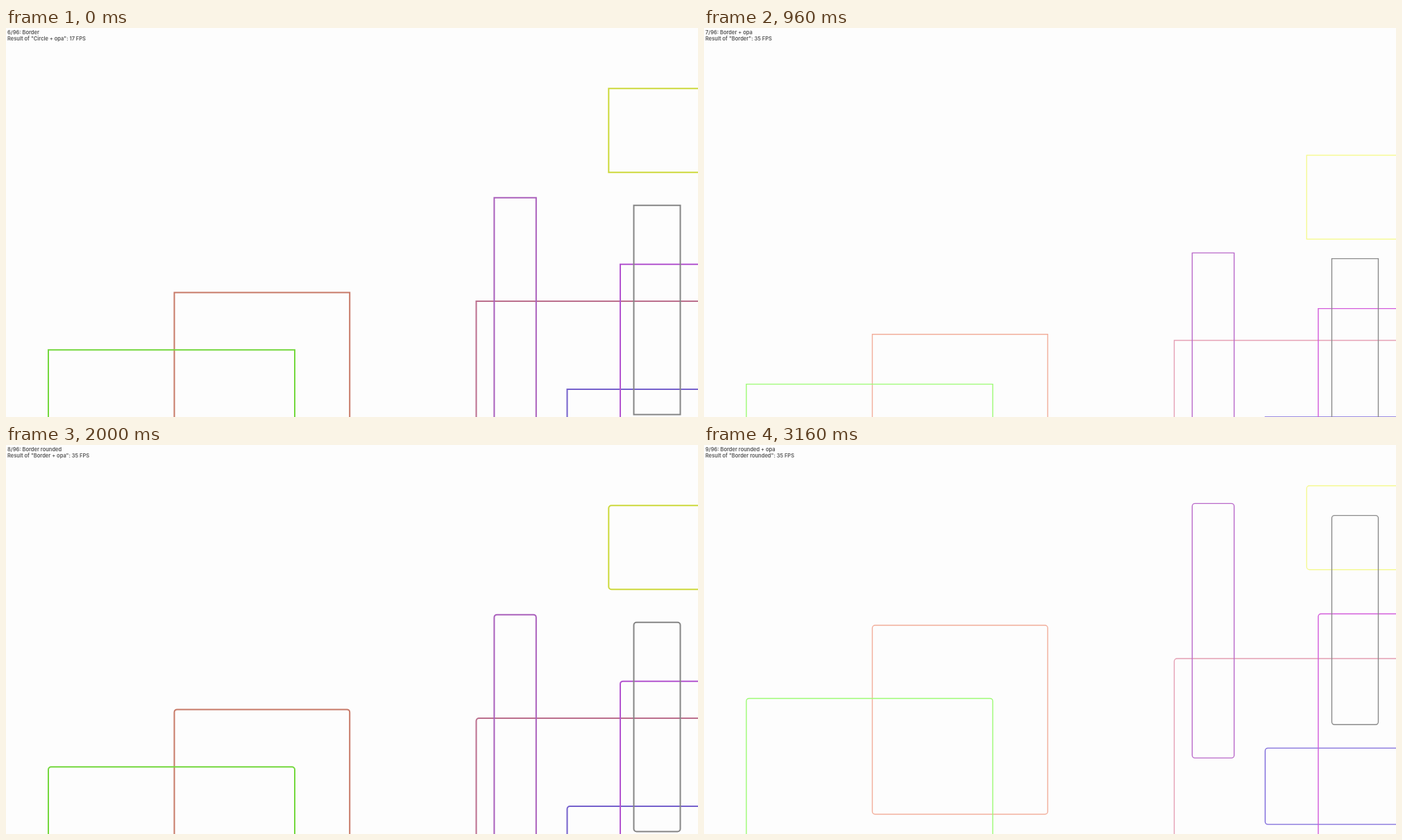
An HTML page with a canvas for the animation above (3.2 s loop, 997 by 561 pixels).

```html
<!DOCTYPE html>
<html lang="en">
<head>
<meta charset="utf-8">
<title>Border benchmark</title>
<style>
  html, body { margin: 0; width: 100%; height: 100%; overflow: hidden; background: #fdfdfd; }
  canvas { display: block; }
</style>
</head>
<body>
<canvas id="stage" width="997" height="561"></canvas>
<script>
const W = 997, H = 561, LOOP = 3200, STEP = 40, START_Y = 286.6;
const ctx = document.getElementById('stage').getContext('2d');

// start: when the boxes begin to fall; stall: a short hang (ms) soon after
const scenes = [
  { start: -525.7, title: '6/96: Border', last: '"Circle + opa": 17' },
  { start: 473.5, stall: 28, opa: true, title: '7/96: Border + opa', last: '"Border": 35' },
  { start: 1474.3, rounded: true, title: '8/96: Border rounded', last: '"Border + opa": 35' },
  { start: 2490.3, stall: 9, opa: true, rounded: true, late: true,
    title: '9/96: Border rounded + opa', last: '"Border rounded": 35' }
];

// speed in px/ms; rest: pause at the bottom in ms; late: longer pause in the last scene
const boxes = [
  { x: 677.5, w: 400, h: 387, speed: 0.842, rest: 1.4, late: 33, solid: '#bb6f8d', pale: '#e5a0b4' },
  { x: 242.5, w: 252.7, h: 272.5, speed: 0.899, rest: 20.7, solid: '#c87a68', pale: '#f2ae9b' },
  { x: 61, w: 355, h: 329.5, speed: 0.7327, rest: 19.3, solid: '#74d83e', pale: '#9dfa74' },
  { x: 868.3, w: 400, h: 121, speed: 1.432, rest: 3.3, late: 33, solid: '#cdd93c', pale: '#f5f994' },
  { x: 808.5, w: 400, h: 110, speed: 0.6216, rest: 20, solid: '#7561cc', pale: '#7c68da' },
  { x: 703.4, w: 60.4, h: 367, speed: 1.187, rest: 28, skip: 18, solid: '#aa60bc', pale: '#b969c9' },
  { x: 885, w: 400, h: 367, speed: 0.952, rest: 6, late: 33, solid: '#b354cf', pale: '#d25bda' },
  { x: 904.5, w: 67, h: 301.7, speed: 1.1426, rest: 18.5, solid: '#858585', pale: '#8b8b8b' }
];

// Falls from the middle, then bounces between the bottom and the top.
function boxTop(box, s, late) {
  const fall = (H - START_Y) / box.speed;
  if (s <= fall) return START_Y + box.speed * s;
  const rest = box.rest + (late && box.late || 0);
  const y = H - box.speed * Math.max(0, s - fall - rest);
  if (y >= 0) return y;
  const down = (box.skip || 0) - y;
  return Math.min(down, 2 * H - down);
}

function draw(t) {
  const scene = scenes.findLast(sc => sc.start <= t);
  let s = t - scene.start;
  if (s > 150) s = Math.max(150, s - (scene.stall || 0));

  ctx.fillStyle = '#fdfdfd';
  ctx.fillRect(0, 0, W, H);
  ctx.lineWidth = scene.opa ? 1.4 : 2;
  for (const box of boxes) {
    ctx.strokeStyle = scene.opa ? box.pale : box.solid;
    ctx.beginPath();
    ctx.roundRect(box.x, boxTop(box, s, scene.late), box.w, box.h, scene.rounded ? 4 : 0);
    ctx.stroke();
  }

  ctx.fillStyle = '#555';
  ctx.font = '600 7.5px Montserrat, Inter, sans-serif';
  ctx.fillText(scene.title, 2, 9);
  ctx.fillText(`Result of ${scene.last} FPS`, 2, 17.5);
}

const begin = performance.now();
function tick() {
  const t = (performance.now() - begin) % LOOP;
  draw(Math.floor(t / STEP) * STEP);
  requestAnimationFrame(tick);
}
tick();
</script>
</body>
</html>
```
